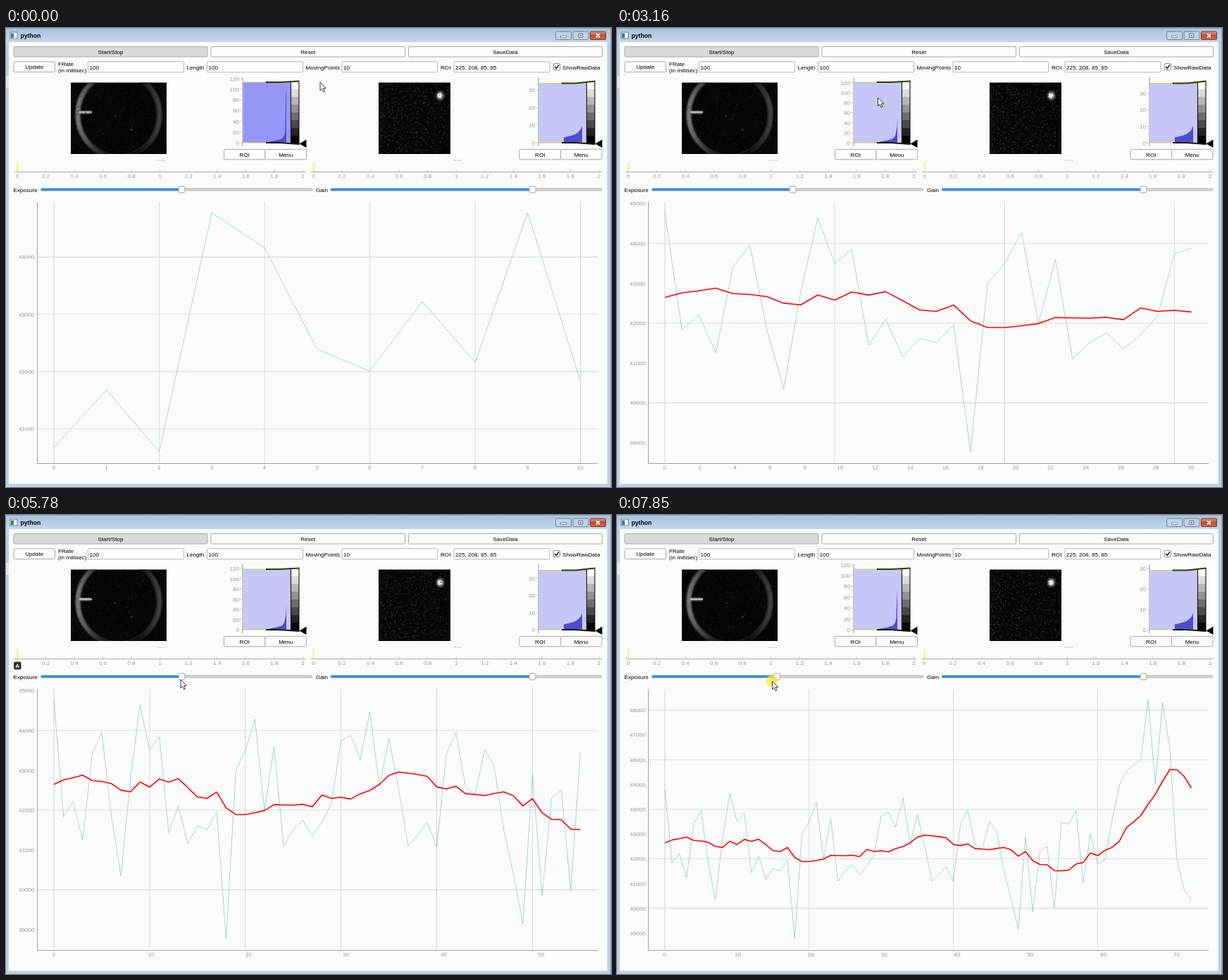
These frames come from a looping animation (859x652 px, 8000 ms). An HTML page:

```html
<!DOCTYPE html>
<html lang="en">
<head>
<meta charset="utf-8">
<title>Camera monitor</title>
<style>
html, body { margin: 0; width: 100%; height: 100%; overflow: hidden; background: #b9d1ea; }
svg { display: block; width: 859px; height: 652px; }
text { font: 8.1px "Liberation Sans", Arial, sans-serif; fill: #000; }
.tick { fill: #969696; }
.mid { text-anchor: middle; }
.end { text-anchor: end; }
</style>
</head>
<body>
<svg id="stage" viewBox="0 0 859 652" xmlns="http://www.w3.org/2000/svg"></svg>
<script>
const LOOP = 8000;
const STEPS = [0, 250, 570, 820, 1070, 1350, 1590, 1860, 2140, 2370, 2640, 2900, 3160, 3420, 3690, 3930,
  4210, 4460, 4730, 4980, 5250, 5520, 5780, 6060, 6310, 6570, 6850, 7070, 7340, 7620, 7850];

// Measured signal, in tens of counts
const SIGNAL = [4068, 4168, 4060, 4477, 4416, 4239, 4201, 4322, 4216,
  4477, 4184, 4221, 4125, 4340, 4396, 4185, 4035, 4280, 4464, 4350, 4385, 4144, 4210, 4116, 4161, 4151, 4196,
  3877, 4300, 4350, 4428, 4200, 4360, 4110, 4151, 4175, 4135, 4170, 4218, 4374, 4388, 4327, 4447, 4260, 4380,
  4255, 4110, 4137, 4169, 4108, 4340, 4396, 4258, 4240, 4352, 4310, 4150, 4040, 3914, 4288, 3986, 4231, 4250,
  3999, 4346, 4340, 4394, 4102, 4300, 4180, 4195, 4353, 4495, 4555, 4578, 4600, 4842, 4503, 4829, 4650, 4195,
  4075, 4032].map(v => v * 10);
const WINDOW = 10;

// Keyed values: [time, value]
const SAMPLES = [[0, 10], [1860, 28], [3160, 40], [4730, 54], [5780, 64], [6570, 71], [7850, 82]];
const AXIS_LAG = [[0, 0], [570, 1], [6310, 1], [6570, 0], [6850, 1]];
const LEFT_PITCH = [[0, 15.2], [1860, 14.2], [3160, 14.2], [4730, 14.55], [5780, 14.5], [6570, 15], [7850, 15.4]];
const RIGHT_PITCH = [[0, 25], [1860, 25.5], [3160, 23.3], [4730, 26.9], [5780, 24.3], [6570, 24.1], [7850, 29]];
const SPIKE = [[0, 82], [1860, 84], [3160, 128], [4730, 128], [5780, 128], [6570, 84], [7850, 107]];
const EXPOSURE = [[6060, 249.5], [6570, 269], [6850, 285], [7340, 285], [7620, 240], [7850, 227]];
const MOUSE_X = [[0, 446], [250, 436], [2370, 436], [3160, 370.5], [3420, 370.5], [4460, 43], [4980, 48],
  [5780, 248], [6060, 249], [6570, 270], [6850, 285], [7340, 284], [7620, 238], [7850, 220.5]];
const MOUSE_Y = [[0, 77], [250, 35.5], [2370, 35.5], [3160, 99], [3420, 99], [4460, 58], [4980, 58],
  [5780, 234], [6570, 230], [7850, 236]];

const PLOT = { left: 44.5, right: 840, top: 247, bottom: 618.5, x0: 68, x1: 815.5, y0: 602, y1: 262.5 };

function at(keys, t) {
  const i = keys.findIndex(k => k[0] > t);
  if (i === 0) return keys[0][1];
  if (i < 0) return keys[keys.length - 1][1];
  const [a, va] = keys[i - 1], [b, vb] = keys[i];
  return va + (vb - va) * (t - a) / (b - a);
}

function random(seed) {
  return () => {
    seed = (seed + 0x6D2B79F5) | 0;
    let r = Math.imul(seed ^ seed >>> 15, 1 | seed);
    r = r + Math.imul(r ^ r >>> 7, 61 | r) ^ r;
    return ((r ^ r >>> 14) >>> 0) / 4294967296;
  };
}

const rect = (x, y, w, h, fill, more = "") => `<rect x="${x}" y="${y}" width="${w}" height="${h}" fill="${fill}" ${more}/>`;
const text = (x, y, s, cls = "") => `<text x="${x}" y="${y}" class="${cls}">${s}</text>`;
const path = (d, stroke, width = 1, more = "") => `<path d="${d}" fill="none" stroke="${stroke}" stroke-width="${width}" ${more}/>`;
const shape = (d, fill) => `<path d="${d}" fill="${fill}"/>`;
const range = (n, fn) => Array.from({ length: n }, (_, i) => fn(i)).join("");

function button(x, y, w, label, fill = "#fdfdfd") {
  return rect(x, y, w, 14.5, fill, 'rx="1.5" stroke="#a8a8a8"') + text(x + w / 2, y + 10.3, label, "mid");
}

function field(labelX, label, x, w, value) {
  return text(labelX, 58.7, label) + rect(x, 47.8, w, 15, "#fff", 'rx="1" stroke="#b4b4b4"') + text(x + 2, 58.5, value);
}

function slider(x, end, handle) {
  return rect(x, 227.7, end - x, 3.6, "#cfcfcf", 'rx="1.5" stroke="#b5b5b5" stroke-width=".6"') +
    rect(x, 227.7, handle - x, 3.6, "#2f93e4", 'rx="1.5"') +
    rect(handle - 4.5, 225, 9, 9, "#fcfcfc", 'rx="2" stroke="#999" stroke-width=".9"');
}

function timeline(x) {
  return path(`M${x - 4} 204.5H${x + 410}`, "#aaa") +
    range(11, i => {
      const tx = x + i * 40.55;
      return path(`M${tx} 204v-3`, "#bbb", .8) + text(tx, 213, +(i * .2).toFixed(1), "tick mid");
    }) +
    path(`M${x + .3} 191V204`, "#f4ee50", 1.5) +
    range(5, i => rect(x + 198.5 + i * 2.7, 187.5, 1.2, 1.2, "#b0b0b0"));
}

function levelsPanel(x, top, pitch, unit, fill, curve) {
  const count = Math.floor(92.5 / pitch) + 1;
  const bar = x + 68.5, half = x + 33;
  return path(`M${x} 70V168`, "#969696") +
    range(count, i => {
      const y = 163 - i * pitch;
      return path(`M${x - 4} ${y}h4`, "#bbb", .8) + text(x - 5, y + 3, i * unit, "tick end");
    }) +
    rect(x + .5, top, 68, 163 - top, fill) + shape(curve, "#4c4cd0") +
    path(`M${x} ${top}H${bar}M${x} 163H${bar}`, "#d8cf5a", 1.2) +
    range(8, i => {
      const g = Math.round(255 - i * 255 / 7);
      return rect(bar, 76 + i * 11, 11.5, 11.1, `rgb(${g},${g},${g})`);
    }) +
    path(`M${bar} 76V164M${bar + 11.5} 76V165`, "#111", 1.1) +
    path(`M${half} ${top}H${half + 20}L${bar + 12} 75.5M${half} 163H${half + 20}L${bar + 12} 165`, "#181800", 1.8) +
    path(`M${half + 2} ${top}H${half + 20}L${bar + 11} 75.5`, "#8f8a20", .5) +
    shape(`M${bar + 12} 164.5l10-6v11.5z`, "#000");
}

function speckle(seed, count, x, y, w, h, bias) {
  const rnd = random(seed);
  return range(count, () => `M${(x + w * rnd() ** bias).toFixed(1)} ${(y + h * rnd()).toFixed(1)}h1`);
}

function cameraViews(index) {
  return path(speckle(index + 1, 330, 93, 79, 134, 99, 1), "#222") +
    path(speckle(index + 101, 650, 530, 79, 99, 99, 1.25), "#2e312e") +
    path(speckle(index + 201, 130, 530, 79, 99, 99, 1.4), "#555955");
}

function histograms(t) {
  const peak = at(SPIKE, t);
  const leftCurve = `M370 163L376 161 386 159 392 157 395 153 396.5 146 397.2 ${peak + 15} 398 ${peak}V163Z`;
  const rightCurve = "M792 163V155.5L798 154 804 152.5 809 150.5 813 147.5 816 144 818 139V163Z";
  return levelsPanel(336, 77, at(LEFT_PITCH, t), 20, t < 250 ? "#9696f7" : "#c6c6f7", leftCurve) +
    levelsPanel(756, 78.5, at(RIGHT_PITCH, t), 10, "#c6c6f7", rightCurve);
}

function chart(t) {
  const last = Math.round(at(SAMPLES, t));
  const averaged = t >= 570;
  const first = averaged ? WINDOW - 1 : 0;
  const raw = SIGNAL.slice(first, last + 1);
  const n = raw.length - 1;
  const lo = Math.min(...raw), hi = Math.max(...raw);
  const { left, right, top, bottom, x0, x1, y0, y1 } = PLOT;
  const px = (i, max = n) => x0 + (x1 - x0) * i / max;
  const py = v => y0 - (y0 - y1) * (v - lo) / (hi - lo);
  const line = values => "M" + values.map((v, i) => `${px(i).toFixed(2)} ${py(v).toFixed(2)}`).join("L");
  const gridColor = isMajor => isMajor ? "#d0d0d0" : "#dcdcdc";
  let out = "";

  const density = max => max * 1.063 / 6.68;
  const d = density(n);
  const [gridX, majorX] = d < 1 ? [1, 2] : d < 2 ? [2, 10] : d < 10 ? [10, 20] : [20, 100];
  for (let i = 0; i <= n; i += gridX) out += path(`M${px(i)} ${top}V${bottom}`, gridColor(i % majorX === 0));

  const coarse = (hi - lo) * 371 / 339.5 / 5.916 >= 1000;
  const gridY = coarse ? 2000 : 1000, majorY = coarse ? 10000 : 2000;
  for (let v = Math.ceil(lo / 1000) * 1000 - 1000; py(v) > top; v += 1000) {
    const y = py(v);
    if (y > bottom) continue;
    if (v % gridY === 0) out += path(`M${left} ${y}H${right}`, gridColor(v % majorY === 0));
    out += text(40.5, y + 3, v, "tick end");
  }

  const labelMax = averaged ? n - Math.round(at(AXIS_LAG, t)) : n;
  const stride = density(labelMax) < 2 ? 1 : labelMax <= 46 ? 2 : 10;
  for (let i = 0; i <= labelMax; i += stride) out += text(px(i, labelMax) - .3, 626.5, i, "tick mid");

  out += path(`M${left} ${top}V${bottom}H${right}`, "#a0a0a0");
  out += path(line(raw), "#24b08c", 1, 'stroke-dasharray="1 1.3"');
  if (averaged) {
    const mean = raw.map((_, i) => SIGNAL.slice(i, i + WINDOW).reduce((a, b) => a + b) / WINDOW);
    out += path(line(mean), "#f00", 1.6, 'stroke-linejoin="round"');
  }
  return out;
}

function pointer(t) {
  const x = at(MOUSE_X, t), y = at(MOUSE_Y, t);
  const halo = t >= 6310 ? `<circle cx="${x - .5}" cy="${y}" r="8.5" fill="#f5ee20" opacity=".7"/>` : "";
  const badge = t >= 5520 && t < 6060
    ? rect(11, 208.5, 10.5, 11, "#333", 'rx="2"') + `<text x="16.2" y="217.2" class="mid" style="fill:#fff;font-weight:bold">A</text>` : "";
  return badge + halo + `<path transform="translate(${x} ${y})" d="M0 0V11.8L2.7 9.3 4.7 13.8 6.6 13 4.7 8.6H8.3Z" fill="#fff" stroke="#222" stroke-width=".9"/>`;
}

function windowFrame() {
  return `<defs>
    <linearGradient id="bar" x2="0" y2="1"><stop stop-color="#a8c2df"/><stop offset="1" stop-color="#c3d7ed"/></linearGradient>
    <linearGradient id="red" x2="0" y2="1"><stop stop-color="#e49a88"/><stop offset=".5" stop-color="#c8492f"/><stop offset="1" stop-color="#d9694b"/></linearGradient>
    <linearGradient id="ring"><stop stop-color="#757575"/><stop offset=".2" stop-color="#3a3a3a"/><stop offset=".4" stop-color="#0c0c0c"/><stop offset=".75" stop-color="#101010"/><stop offset="1" stop-color="#404040"/></linearGradient>
    <radialGradient id="spot"><stop stop-color="#fff"/><stop offset=".35" stop-color="#bbb"/><stop offset="1" stop-color="#333" stop-opacity="0"/></radialGradient>
    <filter id="soft"><feGaussianBlur stdDeviation="1.3"/></filter>
    <clipPath id="lens">${rect(92, 77.5, 136, 101.5, "#000")}</clipPath></defs>` +
    rect(0, 0, 859, 652, "#b9d1ea") + rect(0, 0, 859, 20, "url(#bar)") + rect(0, 68, 4, 17, "#dce8f5") +
    path("M0 .5H859M858.5 0V652", "#8ea6c0") +
    rect(4, 20, 849.5, 627.5, "#fcfcfc") +
    rect(6, 6, 10, 9, "#f5f5f5", 'stroke="#667" stroke-width=".8"') + rect(7, 7.5, 4, 6.5, "#2a8a78") +
    `<text x="20.5" y="14" style="font-size:8.6px;font-weight:bold">python</text>` +
    [780.5, 805].map(x => rect(x, 5, 22, 11.5, "#bfd4ea", 'rx="1.5" stroke="#70849c"')).join("") +
    rect(829.5, 5, 22, 11.5, "url(#red)", 'rx="1.5" stroke="#6b3a3a"') +
    rect(787.5, 11, 8, 2.4, "#fff", 'stroke="#556" stroke-width=".6"') +
    rect(812.8, 8.2, 6, 5, "#fff", 'stroke="#556" stroke-width=".9"') + rect(814.5, 10, 2.6, 1.6, "#556") +
    path("M838 8.3l5 5M843 8.3l-5 5", "#fff", 1.7);
}

function controls() {
  return button(11, 26.5, 275, "Start/Stop", "#dadada") + button(291, 26.5, 275.5, "Reset") + button(571.5, 26.5, 275, "SaveData") +
    button(11, 48, 58.5, "Update") +
    text(74, 53.5, "FRate") + text(74, 63, "(in millisec)") + field(0, "", 116.5, 136, "100") +
    field(256.5, "Length", 285.5, 136, "100") + field(425.5, "MovingPoints", 477, 135.5, "10") +
    field(617, "ROI", 636, 136, "225, 208, 85, 85") +
    rect(777.3, 50.5, 9.2, 9.2, "#fff", 'stroke="#888" rx="1"') + path("M779.3 55l2 2.4 3.6-5", "#111", 1.5) +
    text(790, 58.5, "ShowRawData") +
    button(309.5, 172.3, 58.5, "ROI") + button(368, 172.3, 58.5, "Menu") +
    button(729, 172.3, 58.5, "ROI") + button(787.5, 172.3, 58.5, "Menu") +
    timeline(16) + timeline(436.5) +
    text(10.5, 233, "Exposure") + text(440, 233, "Gain") + slider(461, 846, 747.5);
}

function cameraBase() {
  return rect(92, 77.5, 136, 101.5, "#050505") + rect(529, 77.5, 102, 101.5, "#050505") +
    `<g clip-path="url(#lens)"><g filter="url(#soft)">
      <ellipse cx="160" cy="123" rx="58" ry="60" fill="none" stroke="url(#ring)" stroke-width="7"/></g>
      <ellipse cx="160" cy="123" rx="54" ry="57" fill="none" stroke="#222" stroke-width="1"/></g>` +
    `<g filter="url(#soft)">${rect(101, 117.5, 20, 4.5, "#777")}</g>` + rect(104, 118.5, 18, 2, "#c9c9c9") +
    rect(154, 124, 2, 2, "#333") + rect(177, 143, 2.5, 3, "#333") +
    `<ellipse cx="616.5" cy="96" rx="8" ry="9" fill="url(#spot)"/>` + rect(612.5, 93, 6, 6, "#eee", 'rx="2" opacity=".8"');
}

const stage = document.getElementById("stage");
stage.innerHTML = windowFrame() + cameraBase() + '<g id="noise"></g>' + controls() + '<g id="live"></g>';
const noise = document.getElementById("noise");
const live = document.getElementById("live");
let shown = -1;

function render(time) {
  let index = STEPS.length - 1;
  while (STEPS[index] > time) index--;
  if (index === shown) return;
  shown = index;
  const t = STEPS[index];
  noise.innerHTML = cameraViews(index);
  live.innerHTML = histograms(t) + slider(49.5, 435, at(EXPOSURE, t)) + chart(t) + pointer(t);
}

const start = performance.now();
function tick() {
  render((performance.now() - start) % LOOP);
  requestAnimationFrame(tick);
}
tick();
</script>
</body>
</html>
```
